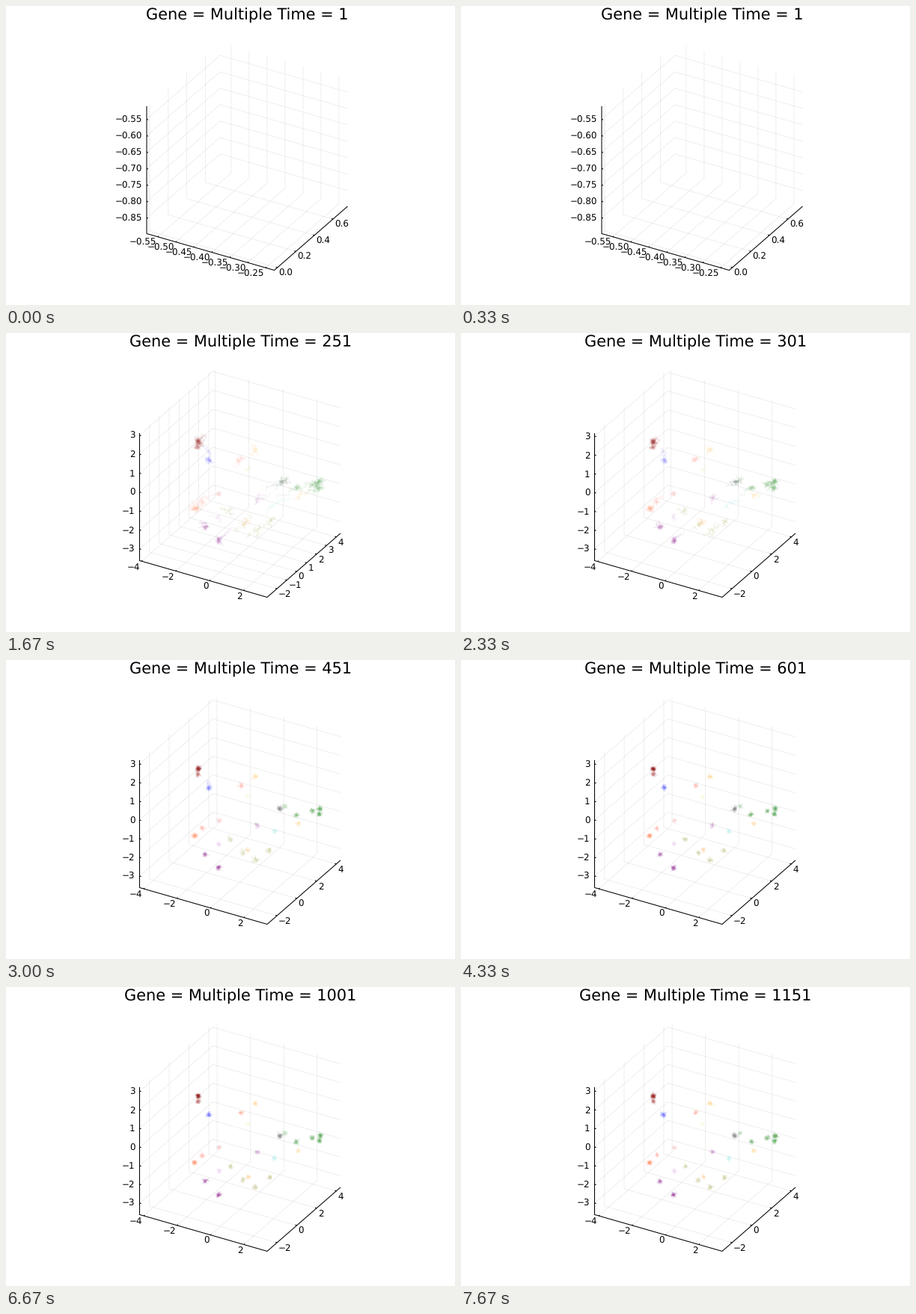
A matplotlib script that plays this animation: 600 px wide and 400 px high, repeating every 8000 ms.

```python
import math

import matplotlib.pyplot as plt
import numpy as np
from matplotlib.animation import FuncAnimation
from matplotlib.collections import LineCollection

W, H, DPI = 600, 400, 100
FRAMES, LOOP_MS = 24, 8000
STEP, TRAIL = 10, 10  # time units per sample, samples in each tail

plt.rcParams["font.family"] = "DejaVu Sans"
plt.rcParams["text.hinting"] = "none"

fig = plt.figure(figsize=(W / DPI, H / DPI), dpi=DPI, facecolor="white")
ax = fig.add_axes([0, 0, 1, 1])

# Screen vectors of the box edges, and where all cells begin.
EX, EY, EZ = np.array([[170.5, 49], [98, -85.5], [0, -170.5]])
ORIGIN = np.array([309, 217])

# Lower and upper limit of each axis: first value, last value, easing time.
LIMITS = {
    "x": ((-.581, -4.25, 75), (-.226, 3.4, 49)),
    "y": ((-.033, -2.99, 35), (.758, 4.42, 30)),
    "z": ((-.898, -3.62, 35), (-.51, 3.21, 69)),
}

# Three points on each branch; its groups: colour, cells, cluster centres.
BRANCHES = [
    ([(286, 122), (268, 136), (252, 145)],
     [("darkred", 22, [(257, 146)]),
      ("brown", 11, [(257, 153)]),
      ("blue", 8, [(271, 171)])]),
    ([(324, 154), (297, 197), (250, 229)],
     [("orange", 5, [(333, 156)]),
      ("tomato", 6, [(314, 168), (262, 225)]),
      ("khaki", 3, [(323, 183)]),
      ("coral", 16, [(252, 235)])]),
    ([(302, 224), (255, 230), (267, 258)],
     [("lightcoral", 5, [(285, 215)]),
      ("mediumorchid", 3, [(285, 246)]),
      ("purple", 9, [(266, 260)]),
      ("olive", 4, [(300, 240)])]),
    ([(284, 276), (348, 230), (428, 200)],
     [("purple", 12, [(284, 278)]),
      ("purple", 4, [(336, 221)]),
      ("olive", 4, [(317, 258)]),
      ("darkorange", 4, [(324, 254)]),
      ("#33403c", 10, [(366, 199)]),
      ("forestgreen", 4, [(373, 196)]),
      ("forestgreen", 9, [(388, 207), (409, 202)]),
      ("forestgreen", 14, [(420, 199)])]),
    ([(318, 276), (363, 246), (426, 201)],
     [("olive", 5, [(333, 268), (352, 255)]),
      ("orange", 4, [(391, 219)]),
      ("turquoise", 4, [(358, 229)]),
      ("green", 10, [(419, 206)])]),
]


def curve(points, s):
    """Quadratic curve through three points."""
    a, mid, b = np.array(points, float)
    s = np.asarray(s)[..., None]
    return (a * (1 - s) * (1 - 2 * s) + 4 * mid * s * (1 - s)
            + b * s * (2 * s - 1))


def make_cell(points, centre, times, rng):
    """Leave the origin, join the branch, slide along it and settle."""
    grid = np.linspace(0, 1, 101)
    end = grid[np.hypot(*(curve(points, grid) - centre).T).argmin()]
    start = np.clip(end + rng.uniform(-.65, .65), 0, 1)
    tau = 65 * rng.lognormal(0, .4)
    left = np.exp(-np.maximum(times - 40, 0) / tau)
    home = centre - curve(points, end)
    aside = rng.normal(0, 6, 2)
    path = curve(points, end + (start - end) * left)
    left = left[:, None]
    path = path + home * (1 - left) + aside * np.sqrt(left)
    join = np.clip(times / 38, 0, 1)[:, None]
    path = ORIGIN + (path - ORIGIN) * join ** 2 * (3 - 2 * join)
    return path + rng.normal(0, 1.9, path.shape) * (1 + .6 * left)


def make_cells():
    rng = np.random.default_rng(7)
    times = np.arange(1, 50 * FRAMES, STEP)
    tracks, colors = [], []
    for points, groups in BRANCHES:
        for color, count, centres in groups:
            for centre in centres * count:
                tracks.append(make_cell(points, np.array(centre), times, rng))
                colors.append(color)
    order = rng.permutation(len(tracks))
    return np.array(tracks)[order], [colors[i] for i in order]


TRACKS, COLORS = make_cells()


def limits(axis, time):
    return [last + (first - last) * math.exp(-(time - 1) / tau)
            for first, last, tau in LIMITS[axis]]


def ticks(axis, time, step, decimals):
    lo, hi = limits(axis, time)
    for n in range(math.ceil(lo / step), math.floor(hi / step) + 1):
        text = f"{abs(n * step):.{decimals}f}"
        yield (n * step - lo) / (hi - lo), ("−" if n < 0 else "") + text


def label(pos, text, ha):
    ax.text(pos[0], pos[1] + 4.3, text, ha=ha, va="baseline", fontsize=8.6)


def draw_box(time):
    left = np.array([188.0 if time == 1 else 178.5, 304.5])
    front, back = left + EX, left + EY
    right = front + EY
    if time == 1:
        x_step, y_step, z_step = (.05, 2), (.2, 1), (.05, 2)
    else:
        x_step = (1 if time < 251 else 2, 0)
        y_step = (1 if time < 301 else 2, 0)
        z_step = (1, 0)

    grid, marks = [], []
    for u, text in ticks("x", time, *x_step):
        p = left + u * EX
        grid.append([p, p + EY, p + EY + EZ])
        marks.append([p, p + .012 * EY])
        label(p + (-1.5, 7), text, "right")
    for u, text in ticks("y", time, *y_step):
        p = front + u * EY
        grid.append([p, p - EX, p - EX + EZ])
        marks.append([p, p - .012 * EX])
        label(p + (2, 6.5), text, "left")
    for u, text in ticks("z", time, *z_step):
        p = left + u * EZ
        grid.append([p, back + u * EZ, right + u * EZ])
        marks.append([p, p + .012 * EX])
        label(p + (-6, 0), text, "right")

    ax.add_collection(LineCollection(grid, colors="black", alpha=.1,
                                     linewidths=.45, zorder=1))
    edges = [[left + EZ, left, front, right]]
    ax.add_collection(LineCollection(edges + marks, colors="black",
                                     linewidths=.75, zorder=3))
    ax.text((left[0] + right[0]) / 2 + .4, 18.3,
            f"Gene = Multiple Time = {time}",
            ha="center", va="baseline", fontsize=15)


def update(frame):
    ax.clear()
    ax.set(xlim=(0, W), ylim=(H, 0))
    ax.axis("off")
    draw_box(1 + 50 * frame)
    now = 50 * frame // STEP
    if now:
        tails = TRACKS[:, max(0, now - TRAIL):now + 1]
        ax.add_collection(LineCollection(list(tails), colors=COLORS, alpha=.085,
                                         linewidths=.6, zorder=2))
    return ax.get_children()


anim = FuncAnimation(fig, update, frames=FRAMES, init_func=lambda: update(0),
                     interval=LOOP_MS / FRAMES, repeat=True, repeat_delay=0)
plt.show()
```
